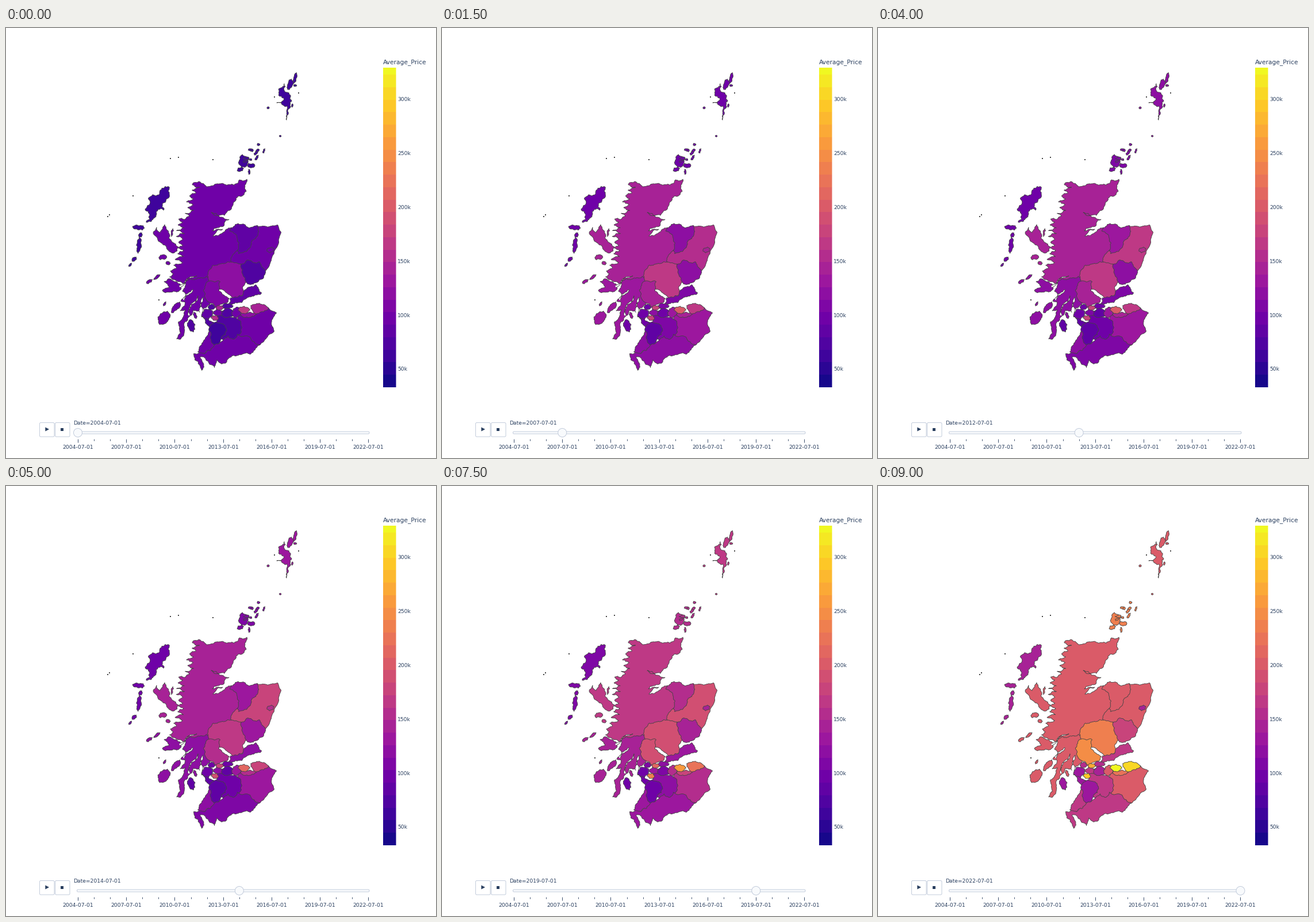
A matplotlib script for the animation above (9.5 s loop, 748x748 px).

```python
import random
import numpy as np
import matplotlib.pyplot as plt
from matplotlib.animation import FuncAnimation
from matplotlib.collections import PolyCollection
from matplotlib.colors import LinearSegmentedColormap
from matplotlib.patches import Circle, FancyBboxPatch, Polygon, Rectangle

SIZE, DPI, YEARS = 748, 64, 19
PX = 72 / DPI
INK, EDGE, FRAME = "#2a3f5f", "#444444", "#bec8d9"
BAR_TOP, BAR_END, BAND = 69, 625, 21.76

fig = plt.figure(figsize=(SIZE / DPI, SIZE / DPI), dpi=DPI, facecolor="white")
ax = fig.add_axes([0, 0, 1, 1])
ax.set_xlim(0, SIZE)
ax.set_ylim(SIZE, 0)
ax.axis("off")

plasma = LinearSegmentedColormap.from_list("steps", [
    "#0d0887", "#46039f", "#7201a8", "#9c179e", "#bd3786",
    "#d8576b", "#ed7953", "#fb9f3a", "#fdca26", "#f0f921"], N=512)


def price_y(k):
    return 593 - (k - 50) * 1.88


def band_color(y):
    mid = (np.floor((BAR_END - y) / BAND) + 0.5) * BAND
    return plasma(mid / (BAR_END - BAR_TOP))


def price_series(keys):
    """Key prices for 2004, 2009, 2017 and 2022: boom, slump, late rise."""
    years, knots = np.arange(YEARS), [0, 5, 13, 18]
    phase = np.interp(years, knots, range(4))
    swing = np.where(phase < 1, 0.095, -0.08) * np.sin(np.pi * (phase % 1))
    return np.interp(years, knots, keys) * (1 + swing)


def rough_line(a, b, amount=0.2):
    """Fractal line; the same two ends always give the same line."""
    a, b = tuple(map(float, a)), tuple(map(float, b))
    lo, hi = sorted([a, b])
    rnd = random.Random(f"{lo}{hi}")

    def split(p, q):
        d = q - p
        if np.hypot(*d) < 3:
            return [p]
        m = (p + q) / 2 + np.array([-d[1], d[0]]) * rnd.uniform(-amount, amount)
        return split(p, m) + split(m, q)

    line = split(np.array(lo), np.array(hi)) + [np.array(hi)]
    return (line if a == lo else line[::-1])[:-1]


def ring(*xy, amount=0.2):
    pts = list(zip(xy[::2], xy[1::2]))
    return [p for a, b in zip(pts, pts[1:] + pts[:1])
            for p in rough_line(a, b, amount)]


def blob(cx, cy, rx, ry, tilt=0, wild=0.15):
    """Uneven ellipse, tilted anticlockwise in degrees."""
    rnd = random.Random(f"{cx}{cy}")
    n = max(6, int(rx + ry) // 2)
    c, s = np.cos(np.radians(tilt)), np.sin(np.radians(tilt))
    xy = []
    for a in np.linspace(0, 2 * np.pi, n, endpoint=False):
        r = 1 + rnd.uniform(-wild, wild)
        x, y = rx * r * np.cos(a), ry * r * np.sin(a)
        xy += [cx + x * c + y * s, cy - x * s + y * c]
    return ring(*xy)


def fjords(ys, xs, n, depth):
    """Headlands and inlets in turn along a north-south coast."""
    rnd = random.Random(4)
    xy = []
    for i, t in enumerate(np.linspace(0, 1, n)):
        y = ys[0] + t * (ys[-1] - ys[0])
        x = np.interp(-y, [-v for v in ys], xs)
        xy += [x + (-1) ** i * depth * rnd.uniform(0.5, 1.3), y]
    return xy


regions = []


def region(keys, *shapes):
    art = PolyCollection(shapes, edgecolors=EDGE, linewidths=0.85 * PX, zorder=2)
    ax.add_collection(art)
    regions.append((price_series(keys), art))


def loch(x0, y0, x1, y1, half=2):
    d = np.array([x1 - x0, y1 - y0], float)
    n = np.array([-d[1], d[0]]) / np.hypot(*d) * half
    a, head, b = np.array([x0, y0]) + n, np.array([x1, y1]), np.array([x0, y0]) - n
    shore = rough_line(a, head) + rough_line(head, b) + [b]
    ax.add_patch(Polygon(shore, fc="white", ec="none", zorder=3))
    ax.plot(*np.array(shore).T, color=EDGE, lw=0.8 * PX, zorder=3)


# Highland with Skye and the small isles
west = fjords([438, 428, 408, 385, 335, 322, 300, 272],
              [290, 286, 300, 304, 303, 319, 320, 331], 34, 6)
region((98, 145, 160, 198),
       ring(335, 267, 349, 276, 372, 271, 404, 269, 406, 264, 419, 263, 418, 284,
            395, 308, 380, 326, 357, 321, 388, 333, 378, 345, 359, 353, 377, 350,
            360, 362, 392, 347, 412, 375, 396, 408, 356, 440, 312, 444, *west),
       ring(256, 357, 262, 347, 268, 356, 276, 342, 284, 358, 289, 372,
            300, 381, 293, 391, 270, 374),
       blob(289, 356, 7, 2, 80), blob(272, 399, 7, 5), blob(282, 409, 4, 3))

# Argyll with Mull, Jura, Islay and others
region((95, 133, 130, 198),
       ring(312, 444, 320, 436, 349, 432, 362, 440, 356, 478, 342, 491, 326, 491,
            316, 505, 304, 541, 297, 541, 302, 520, 300, 511, 312, 490, 303, 492,
            312, 478, 304, 475, 313, 463, 307, 458),
       ring(275, 441, 283, 436, 305, 452, 298, 459, 272, 457, 284, 451),
       blob(295, 486, 13, 4, 52), blob(274, 504, 12, 9, 60), blob(276, 480, 4, 2, 60),
       blob(249, 441, 6, 3, 30), blob(263, 433, 7, 2, 38), blob(329, 500, 6, 3, -70))

for inlet in [(302, 450, 332, 431), (309, 473, 325, 455), (318, 500, 334, 466),
              (339, 495, 343, 468)]:
    loch(*inlet)

# Outer Hebrides
region((66, 102, 98, 145),
       ring(283, 276, 284, 288, 275, 304, 274, 317, 262, 319, 244, 338, 250, 326,
            242, 315, 248, 298, 266, 290, amount=0.28),
       blob(232, 348, 10, 5, 0, 0.4), blob(234, 360, 4, 4, 0, 0.3),
       blob(231, 378, 13, 4, 85, 0.25), blob(223, 402, 6, 3, 45), blob(216, 412, 4, 1.5, 50))

# Orkney: two large islands and a scatter to the north-east
rnd = random.Random(11)
north_isles = [blob(418 + 25 * t + rnd.uniform(-8, 8), 230 - 24 * t + rnd.uniform(-6, 6),
                    rnd.uniform(2, 6), 2.2, rnd.uniform(0, 90), 0.4)
               for t in np.linspace(0, 1, 11)]
region((65, 107, 130, 230), blob(412, 232, 8, 10, 10, 0.2), blob(426, 239, 7, 4),
       blob(408, 246, 6, 4, 20), blob(423, 250, 2, 5), *north_isles)

# Shetland
region((62, 110, 165, 198),
       ring(488, 160, 488, 136, 471, 130, 483, 122, 474, 107, 484, 97, 490, 112,
            497, 126, 493, 140, amount=0.3),
       blob(494, 98, 10, 4, 75), blob(503, 87, 9, 3, 75), blob(503, 100, 3, 2),
       blob(498, 135, 3, 1.5, 80), blob(456, 139, 2, 2), blob(477, 188, 2, 1.5))

# North-east and centre
region((95, 168, 200, 198),
       ring(437, 344, 472, 342, 478, 355, 466, 390, 452, 421, 405, 412, 390, 405,
            410, 380, amount=0.12))
region((80, 138, 145, 198),
       ring(391, 347, 408, 341, 437, 343, 438, 350, 426, 372, 412, 390, 404, 392,
            402, 368, 389, 353))
region((95, 160, 165, 145), blob(460, 385, 7, 5, 20))
region((115, 170, 180, 240),
       ring(350, 430, 360, 412, 385, 406, 408, 410, 419, 440, 411, 452, 413, 461,
            396, 471, 360, 450, amount=0.14))
region((112, 148, 180, 246),
       ring(343, 455, 352, 440, 372, 441, 370, 457, 388, 470, 382, 478, 365, 486,
            355, 478))
region((75, 128, 145, 175),
       ring(408, 412, 420, 403, 440, 406, 450, 420, 448, 433, 432, 443, 420, 445))
region((82, 115, 130, 165),
       ring(387, 479, 390, 469, 411, 465, 415, 455, 434, 446, 444, 460, 428, 466,
            410, 477))

# Southern areas
region((95, 138, 152, 198),
       ring(404, 500, 432, 497, 456, 486, 470, 495, 462, 518, 466, 527, 441, 551,
            402, 538, amount=0.13))
region((78, 112, 108, 165),
       ring(366, 497, 380, 490, 406, 508, 405, 533, 396, 545, 378, 545, 368, 520))
region((95, 125, 118, 165),
       ring(345, 566, 374, 545, 386, 535, 396, 541, 402, 532, 424, 537, 441, 551,
            424, 567, 400, 570, 375, 584, 366, 577, 362, 590, 337, 572, 340, 595,
            328, 577, 326, 566))
region((95, 125, 125, 165),
       ring(352, 528, 360, 524, 362, 551, 345, 566, 333, 563, 346, 541))
region((65, 95, 95, 130),
       ring(354, 516, 372, 513, 381, 520, 381, 533, 362, 551, 356, 530))
region((75, 98, 98, 130),
       ring(340, 502, 350, 503, 362, 513, 354, 520), blob(323, 518, 11, 6, -75, 0.08))

# Central belt
for keys, *spot in [((80, 100, 98, 130), 350, 497, 10, 9),
                    ((70, 100, 100, 150), 357, 485, 7, 5),
                    ((95, 118, 130, 170), 368, 495, 9, 6),
                    ((75, 98, 98, 145), 385, 495, 10, 8),
                    ((75, 108, 110, 155), 385, 483, 10, 5),
                    ((95, 135, 150, 200), 400, 494, 8, 9),
                    ((115, 150, 175, 225), 421, 498, 14, 5),
                    ((168, 200, 245, 325), 414, 490, 10, 6),
                    ((138, 170, 210, 305), 440, 487, 16, 8),
                    ((140, 185, 205, 265), 371, 486, 7, 4),
                    ((150, 180, 220, 295), 363, 504, 7, 5)]:
    region(keys, blob(*spot))

rocks = [(177, 328), (180, 325), (286, 227), (300, 225), (221, 292),
         (360, 229), (509, 113), (467, 120), (266, 473)]
ax.scatter(*zip(*rocks), s=(1.4 * PX) ** 2, c=EDGE, marker="s", linewidths=0)


def text(x, y, s, px, ha="left"):
    return ax.text(x, y, s, fontsize=px * PX, color=INK, ha=ha,
                   va="center_baseline", family="DejaVu Sans", zorder=5)


# Colour bar
for y in np.arange(BAR_END, BAR_TOP, -BAND):
    top = max(round(y - BAND), BAR_TOP)
    ax.add_patch(Rectangle((656, top), 22.5, round(y) - top, lw=0, snap=False,
                           fc=band_color(y - 1)))
text(656, 58.5, "Average_Price", 10.6)
for k in range(50, 301, 50):
    text(681, price_y(k), f"{k}k", 9.1)


# Buttons and slider
def box(x, y, w, h, r, fill):
    ax.add_patch(FancyBboxPatch((x, y), w, h, fc=fill, ec=FRAME, lw=0.9 * PX,
                                boxstyle=f"round,pad=0,rounding_size={r}"))


for x in (58.5, 85.5):
    box(x, 686.5, 25.5, 24.5, 2, "white")
ax.add_patch(Polygon([(68.3, 694.5), (75, 698), (68.3, 701.5)], fc=INK, lw=0))
ax.add_patch(Rectangle((95.5, 695.5), 5, 5, fc=INK, lw=0))
box(123.5, 702, 508.5, 4, 1.8, "#f8fafc")


def slot_x(i):
    return 125 + i * 505.5 / (YEARS - 1)


for i in range(YEARS):
    major = i % 3 == 0
    ax.plot([slot_x(i)] * 2, [715, 720.5 if major else 718], color=INK,
            lw=0.9 * PX, solid_capstyle="butt")
    if major:
        text(slot_x(i), 729, f"{2004 + i}-07-01", 9.3, "center")

knob = Circle((125, 704), 7.5, fc="#f8fafc", ec=FRAME, lw=0.9 * PX, zorder=5)
ax.add_patch(knob)
date = text(117.5, 686.5, "", 9.1)


def update(i):
    for prices, art in regions:
        art.set_facecolor(band_color(price_y(prices[i])))
    knob.center = (slot_x(i), 704)
    date.set_text(f"Date={2004 + i}-07-01")
    return []


anim = FuncAnimation(fig, update, frames=YEARS, interval=500, repeat=True,
                     repeat_delay=0, init_func=lambda: update(0))
plt.show()
```
